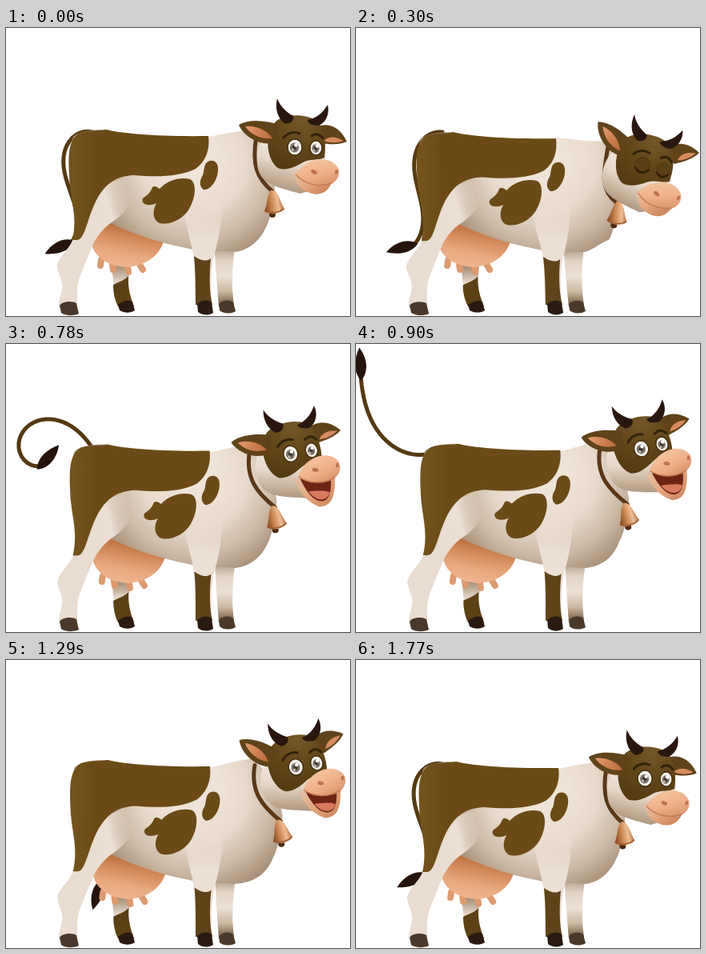
Animation, 430 px wide and 360 px high, one loop 1800 ms. Source, as an HTML page with a canvas:

```html
<!DOCTYPE html>
<html lang="en">
<head>
<meta charset="utf-8">
<title>Cow</title>
<style>
html, body { margin: 0; width: 100%; height: 100%; overflow: hidden; background: #fff; }
canvas { display: block; }
</style>
</head>
<body>
<canvas id="stage" width="430" height="360"></canvas>
<script>
const ctx = document.getElementById('stage').getContext('2d');
const LOOP = 1800, STEP = 30;
const BROWN = '#6b4a17', DARK = '#2a1a12', HOOF = '#4a392a';

// time, head x, y, turn, left ear, right ear
const headKeys = [
  [0, 371, 93, 0, 0, 0],
  [300, 378.5, 119, 11, 20, -32],
  [540, 367.5, 101.5, 1, 2, -13],
  [780, 354, 80.5, -12, 2, -13],
  [1050, 352.5, 70.5, -16, 14, -29],
  [1290, 359.5, 77, -13, 28, -29],
  [1650, 371, 93, 0, 2, -2]
];

// time, then heading a + b*s + c*s^2 along the tail, and length
const tailKeys = [
  [0, 195, -415, 346, 1],
  [300, 187, -383, 330, 1],
  [540, 185, -270, 110, 1],
  [780, 236, -60, -180, 1],
  [900, 145, 210, -90, 1],
  [1050, 130, 205, 0, 1],
  [1170, 140, -20, 60, .55],
  [1290, 160, -300, 230, 1]
];

const clamp = v => Math.max(0, Math.min(1, v));
const rad = a => a * Math.PI / 180;
const smooth = (t, from, to) => {
  const u = clamp((t - from) / (to - from));
  return u * u * (3 - 2 * u);
};

// Smooth cyclic curve through rows of [time, ...values]
function sample(rows, t) {
  const n = rows.length;
  const i = rows.filter(r => r[0] <= t).length - 1;
  const time = k => rows[(k + n) % n][0] + Math.floor(k / n) * LOOP;
  const val = (k, c) => rows[(k + n) % n][c];
  const slope = (k, c) => (val(k + 1, c) - val(k - 1, c)) / (time(k + 1) - time(k - 1));
  const span = time(i + 1) - time(i), u = (t - time(i)) / span;
  const ease = smooth(u, 0, 1);
  return rows[0].slice(1).map((_, j) => {
    const c = j + 1;
    return val(i, c) * (1 - ease) + val(i + 1, c) * ease +
      span * u * (1 - u) * ((1 - u) * slope(i, c) - u * slope(i + 1, c));
  });
}

function fill(d, color) {
  ctx.fillStyle = color;
  ctx.fill(new Path2D(d));
}

function line(d, color, width) {
  ctx.strokeStyle = color;
  ctx.lineWidth = width;
  ctx.lineCap = ctx.lineJoin = 'round';
  ctx.stroke(new Path2D(d));
}

function oval(x, y, rx, ry, color, turn = 0) {
  ctx.fillStyle = color;
  ctx.beginPath();
  ctx.ellipse(x, y, rx, ry, rad(turn), 0, 7);
  ctx.fill();
}

function addStops(g, colors) {
  colors.forEach((c, i) => g.addColorStop(i / (colors.length - 1), c));
  return g;
}
const linear = (x1, y1, x2, y2, ...colors) =>
  addStops(ctx.createLinearGradient(x1, y1, x2, y2), colors);
const radial = (x, y, r, ...colors) =>
  addStops(ctx.createRadialGradient(x, y, 0, x, y, r), colors);

// Draws around a pivot at (px, py) placed at (x, y)
function place(x, y, angle, px, py, draw) {
  ctx.save();
  ctx.translate(x, y);
  ctx.rotate(rad(angle));
  ctx.translate(-px, -py);
  draw();
  ctx.restore();
}
const shift = (x, y, draw) => place(x, y, 0, 0, 0, draw);

const hide = radial(235, 165, 132, '#f0e4d9', '#efe2d6', '#e8d9cb', '#cebba7', '#a68f78');

function drawTail(a, b, c, size) {
  const heading = s => rad(a + b * s + c * s * s);
  const parts = 30, step = 165 * size / parts;
  let x = 108, y = 130, d = `M${x} ${y}`;
  for (let i = 0; i < parts; i++) {
    const h = heading((i + .5) / parts);
    d += `L${x += step * Math.cos(h)} ${y += step * Math.sin(h)}`;
  }
  line(d, '#563910', 5);
  place(x, y, heading(1.1) * 180 / Math.PI, 0, 0, () =>
    fill(`M-5 0C3 9 ${20 * size} 11 ${36 * size} 0C${28 * size} -4 10 -12 -5 0Z`, '#25140b'));
}

function drawFarLegs() {
  fill('M260 268L287 268C282 300 282 325 285 346L266 348C264 325 262 300 260 268Z',
    linear(0, 272, 0, 348, '#ab967f', '#e2d4c5', '#ece0d4', '#cdb9a3', '#6b5233'));
  fill('M266 345C272 339 281 340 284 343L287 354C280 358 271 357 267 353Z', HOOF);
  fill('M132 290L155 290C154 310 152 318 154 330L160 350L142 350C136 335 133 315 132 290Z',
    linear(0, 298, 0, 318, '#a58f78', '#e6d8ca'));
  fill('M134 321C142 317 149 315 153 310C152 325 156 338 160 348L140 348C135 338 134 328 134 321Z', '#5d4015');
  fill('M140 346C147 340 155 340 158 342L161 353C155 357 147 356 142 353Z', DARK);
}

function drawUdder() {
  line('M119 290L118 297M133 296L134 302M152 298L153 305M166 294L171 302', '#dd9a70', 8);
  fill('M106 268C112 255 122 246 132 240L198 262C195 280 180 296 152 299C125 298 110 285 106 268Z',
    linear(160, 248, 150, 300, '#b96c3c', '#d68d5e', '#e8a880', '#eeb58f'));
}

function drawBody() {
  fill('M84 136C92 128 110 127 125 127C145 132 190 135 250 136L275 136L300 200L300 268' +
    'C285 284 245 280 225 275C190 268 160 258 128 243L90 250C80 210 76 160 84 136Z', hide);
  fill('M84 262C82 275 62 288 64 300C66 310 71 315 70 325C69 335 64 344 67 350L89 350' +
    'C89 335 88 322 92 312C98 296 104 282 110 268C116 258 122 250 132 243C150 232 165 210 168 184L100 200Z',
    linear(105, 240, 158, 226, '#e9dcd0', '#ecdfd3', '#ecdfd300'));
  fill('M67 347C70 341 84 341 88 344L91 357C86 360 74 360 69 356Z', HOOF);
  fill('M222 210C222 250 234 270 235 290C237 310 235 330 237 345L257 345' +
    'C256 325 256 300 260 285C266 265 272 230 270 200Z',
    linear(0, 205, 0, 262, '#ecdfd300', '#ecdfd3'));
  fill('M235 285C242 290 250 293 256 288C254 308 254 330 258 346L237 346C237 325 237 305 235 285Z', '#61431a');
  fill('M239 345C245 339 254 340 257 343L259 356C252 360 245 359 240 355Z', DARK);
  fill('M83 265C90 235 80 215 79 185C78 160 77 140 92 131C105 127 118 129 125 127' +
    'C145 132 190 136 253 135C255 150 251 166 237 176C215 187 185 186 160 184' +
    'C135 185 123 197 113 215C103 235 100 255 94 262C91 266 87 265 83 265Z',
    linear(78, 0, 110, 0, '#75541e', BROWN));
}

function drawSpots() {
  fill('M183 199C187 196 190 200 192 201C202 190 218 186 230 189C239 193 237 213 229 226' +
    'C221 240 202 248 190 243C182 237 184 226 188 219C178 224 168 220 171 213C176 209 180 207 183 199Z', BROWN);
  fill('M251 168C257 163 266 166 265 178C264 192 255 203 247 202C241 198 242 190 246 184C248 178 247 172 251 168Z', BROWN);
}

function drawNeck(nx, ny, bx, by) {
  const cx = bx - 5;
  fill(`M240 138C262 135 278 ${ny + 2} ${nx} ${ny - 1}L${nx + 30} ${ny + 30}L${cx + 6} ${by - 22}` +
    `C${cx + 4} ${by - 5} ${cx + 1} ${by + 20} ${cx - 6} ${by + 31}` +
    `C${cx - 13} 266 ${cx - 28} 279 285 280L250 277Z`, hide);
}

function drawCollar(nx, ny, bx, by, angle) {
  line(`M${nx + 2} ${ny + 7}C${nx - 4} ${ny + 42} ${bx - 22} ${by - 32} ${bx - 1} ${by - 15}`, '#5a3717', 5);
  place(bx, by, angle, 0, 0, () => {
    oval(-2, 13, 4, 4, '#4d2912');
    fill('M-4 -17C5 -19 7 -4 13 6C9 13 -6 14 -12 9C-8 0 -9 -11 -4 -17Z',
      linear(-11, 2, 13, -2, '#8c4f26', '#c98552', '#efbd94', '#a5602f'));
    line('M-11 9C-4 12 7 11 12 6', '#9c5a30', 1.5);
  });
}

function drawEye(x, y, rx, ry, open) {
  oval(x, y, rx + 1.5, ry + 1.5, '#49320f');
  if (open < .15) {
    oval(x, y - 1, rx + 1, ry, '#5a4017');
    line(`M${x - rx} ${y + 4}Q${x} ${y + ry + 3} ${x + rx} ${y + 4}`, '#2c1c0a', 2);
    return;
  }
  ctx.save();
  ctx.beginPath();
  ctx.ellipse(x, y + ry * (1 - open) / 2, rx, ry * open, 0, 0, 7);
  ctx.clip();
  oval(x, y, rx, ry, '#f4f1ec');
  oval(x - .5, y + .5, rx * .65, ry * .62, '#7b7167');
  oval(x - .5, y + .5, rx * .3, ry * .32, '#3d3731');
  oval(x + 1.5, y - 2.5, 2.2, 2.2, '#fff');
  oval(x - 2.5, y + 3, 1.5, 1.5, '#c9c1b8');
  ctx.restore();
}

function drawMuzzle() {
  fill('M362 183C368 174 375 168 387 165C400 162 412 167 416 177C418 187 411 195 400 197C384 198 371 193 362 183Z',
    linear(385, 164, 394, 200, '#f3c4a1', '#efb18a', '#d9936b'));
  oval(385, 180, 4, 2.4, '#bd7250', 25);
  oval(413, 180, 1.8, 3, '#bd7250', 15);
  line('M363 184C373 195 390 200 407 194', '#c47b56', 1.5);
}

function drawMouth(jaw) {
  const j = 14 * jaw;
  fill(`M358 180C362 ${193 + j / 2} 368 ${203 + j * .6} 382 ${207 + j}C397 ${210 + j} 404 ${202 + j * .8} 409 190Z`,
    linear(365, 185, 388, 210 + j, '#e2bb9e', '#e6a57e', '#cf8a62'));
  if (jaw < .03) return;
  fill(`M366 182C371 ${194 + j * .6} 377 ${199 + j} 387 ${201 + j}C397 ${203 + j * .9} 401 ${198 + j / 2} 404 189Z`, '#6e2415');
  fill(`M373 ${194 + j * .4}C382 ${194 + j / 2} 394 ${195 + j / 2} 399 ${198 + j * .6}` +
    `C393 ${203 + j} 380 ${201 + j} 373 ${194 + j * .4}Z`, '#d87960');
}

function drawHead(left, right, jaw, open) {
  place(388, 128, right, 388, 128, () => {
    fill('M385 125C400 117 417 122 426 142C415 147 404 145 392 144Z', '#60431a');
    fill('M397 141C405 134 413 136 422 141C413 144 405 144 397 141Z', '#d78b60');
  });

  // cheek and jowl reach back to the collar
  fill('M332 130C314 140 310 164 317 182C324 196 342 200 368 207L392 200L400 160Z',
    linear(352, 150, 338, 204, '#efe3d7', '#e6d7c8', '#c9b49e', '#a8917a'));
  drawMouth(jaw);

  fill('M329 128C325 146 328 166 340 175C349 179 361 174 371 168C380 163 390 166 398 162' +
    'C401 145 398 125 388 116C375 107 349 107 337 117Z',
    radial(370, 116, 62, '#74562a', '#64471b', '#553b13'));
  shift(2 * jaw, -5 * jaw, drawMuzzle);

  fill('M339 88C342 97 350 105 359 110C361 116 354 121 348 119C339 112 336 100 339 88Z', '#29170f');
  fill('M402 96C405 107 400 118 391 122C384 122 377 120 377 115C388 113 396 106 402 96Z', '#29170f');

  place(337, 128, left, 337, 128, () => {
    fill('M343 121C325 116 305 113 291 121C296 134 315 147 334 144Z', '#60431a');
    fill('M299 123C312 121 327 128 333 138C319 140 306 133 299 123Z',
      linear(300, 123, 333, 138, '#e39a6c', '#b9693c'));
  });

  drawEye(361, 149, 8.5, 9.5, open);
  drawEye(387.5, 150, 7, 8.5, open);
  line('M347 137C352 131 360 129 367 132M382 135C388 131 393 133 396 138', '#34230b', 3);
}

function draw(t) {
  const [hx, hy, turn, left, right] = sample(headKeys, t);
  const c = Math.cos(rad(turn)), s = Math.sin(rad(turn));
  // neck, bell and trunk follow the head
  const nx = hx - 60 * c - 35 * s, ny = hy + 35 * c - 60 * s;
  const bx = nx + 24 - turn * .9, by = ny + 92;
  const sway = (93 - hy) * .15;
  const jaw = smooth(t, 390, 530) - smooth(t, 1200, 1600);
  const open = clamp((Math.abs(t - 300) - 60) / 110);

  const k = sway / 266, sy = 1 + sway / 266;
  const lean = part => {
    ctx.save();
    ctx.transform(1, 0, -k, sy, 350 * k, 350 * (1 - sy));
    part();
    ctx.restore();
  };

  ctx.fillStyle = '#fff';
  ctx.fillRect(0, 0, 430, 360);
  drawTail(...sample(tailKeys, t));
  lean(drawFarLegs);
  shift(sway, 0, drawUdder);
  drawNeck(nx, ny, bx, by);
  lean(drawBody);
  shift(sway, -sway / 2, drawSpots);
  drawCollar(nx, ny, bx, by, -3 * sway);
  place(hx, hy, turn, 371, 93, () => drawHead(left, right, jaw, open));
}

const start = performance.now();
function tick() {
  const t = (performance.now() - start) % LOOP;
  draw(Math.floor(t / STEP) * STEP);
  requestAnimationFrame(tick);
}
tick();
</script>
</body>
</html>
```
